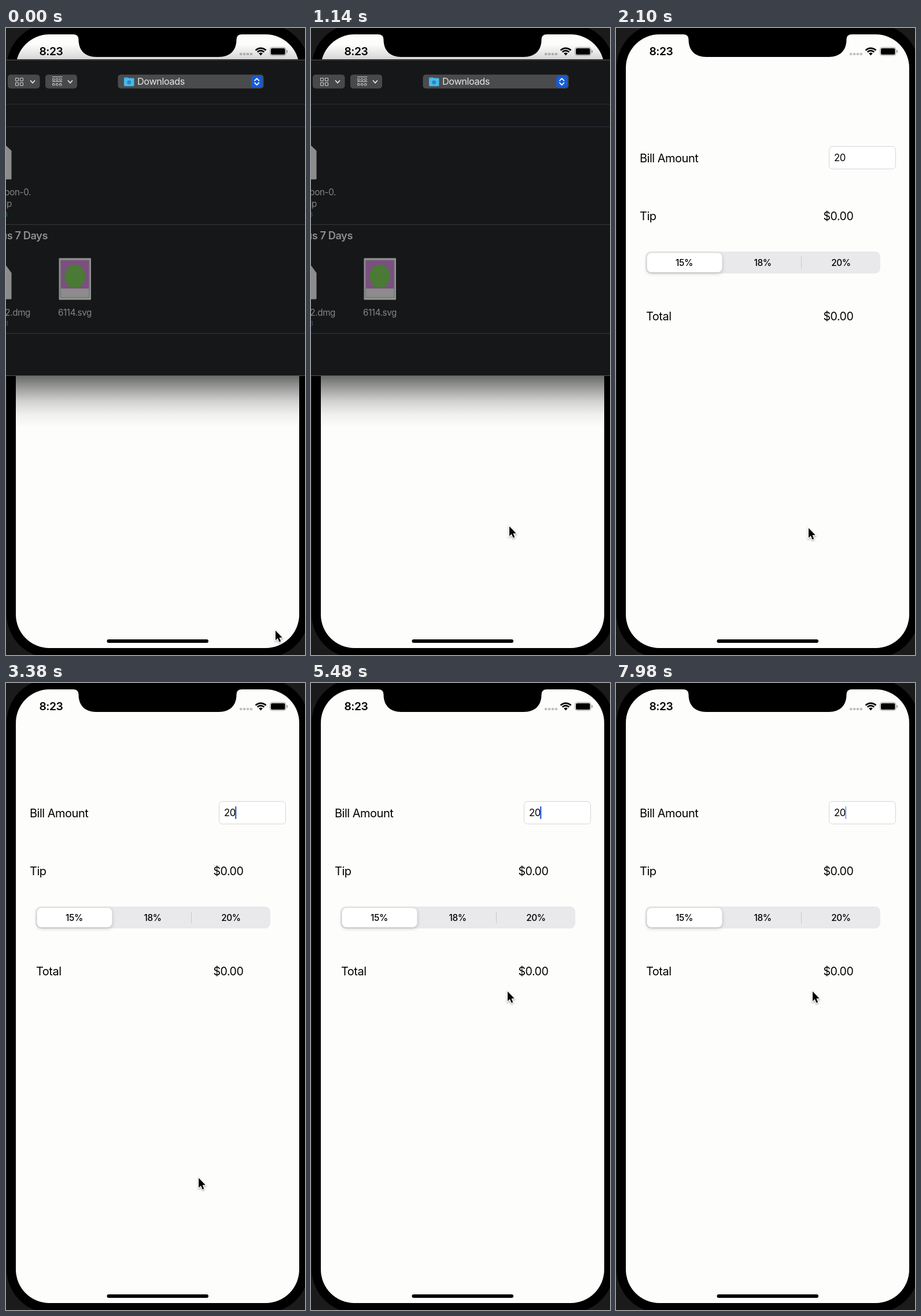
Write an HTML page with a canvas that moves like this. It is 517 px wide and 1083 px high and loops after 8 s.

```html
<!DOCTYPE html>
<html lang="en">
<head>
<meta charset="utf-8">
<title>Tip calculator</title>
<style>
html, body { margin: 0; width: 100%; height: 100%; overflow: hidden; background: #000; }
canvas { display: block; width: 517px; height: 1083px; }
</style>
</head>
<body>
<canvas id="stage" width="517" height="1083"></canvas>
<script>
const W = 517, H = 1083, LOOP = 8000;
const ctx = document.getElementById('stage').getContext('2d');
const FONT = 'Inter, "Liberation Sans", sans-serif';
const PAPER = '#fdfdfc';

function box(x, y, w, h, r, fill, stroke) {
  ctx.beginPath();
  ctx.roundRect(x, y, w, h, r);
  if (fill) { ctx.fillStyle = fill; ctx.fill(); }
  if (stroke) { ctx.strokeStyle = stroke; ctx.lineWidth = 1; ctx.stroke(); }
}

function text(str, x, y, size, color = '#000', weight = 400, align = 'left') {
  ctx.font = `${weight} ${size}px ${FONT}`;
  ctx.letterSpacing = `${(-0.025 * size).toFixed(2)}px`;
  ctx.textAlign = align;
  ctx.fillStyle = color;
  ctx.fillText(str, x, y);
}

function line(points, color, width = 1) {
  ctx.beginPath();
  points.forEach(([x, y]) => ctx.lineTo(x, y));
  ctx.strokeStyle = color;
  ctx.lineWidth = width;
  ctx.lineCap = ctx.lineJoin = 'round';
  ctx.stroke();
}

function fade(y0, y1, stops) {
  const g = ctx.createLinearGradient(0, y0, 0, y1);
  stops.forEach(([at, alpha]) => g.addColorStop(at, `rgba(0,0,0,${alpha})`));
  return g;
}

function drawPhone() {
  ctx.fillStyle = '#1b1b1b';
  ctx.fillRect(0, 0, W, H);
  box(1, -7, 523, 1095, 76, '#000');
  box(17, 11, 490, 1060, 58, PAPER);
}

function drawNotch() {
  ctx.beginPath();
  ctx.moveTo(116, 10);
  ctx.lineTo(116, 11);
  ctx.quadraticCurveTo(125.5, 11, 125.5, 20);
  ctx.bezierCurveTo(125.5, 39, 137, 50, 156, 50);
  ctx.lineTo(368, 50);
  ctx.bezierCurveTo(387, 50, 398.5, 39, 398.5, 20);
  ctx.quadraticCurveTo(398.5, 11, 408, 11);
  ctx.lineTo(408, 10);
  ctx.fillStyle = '#000';
  ctx.fill();
}

function drawStatus() {
  text('8:23', 57.5, 47, 19.3, '#000', 600);
  for (let i = 0; i < 4; i++) box(404 + i * 5.9, 43, 4.4, 4, 1, '#c2c2c2');

  ctx.strokeStyle = '#000';
  ctx.lineCap = 'butt';
  ctx.lineWidth = 2.7;
  for (const r of [12.2, 7.9]) {
    ctx.beginPath();
    ctx.arc(440.5, 47, r, -Math.PI * 0.76, -Math.PI * 0.24);
    ctx.stroke();
  }
  ctx.beginPath();
  ctx.moveTo(440.5, 47.5);
  ctx.arc(440.5, 47, 4.6, -Math.PI * 0.76, -Math.PI * 0.24);
  ctx.fillStyle = '#000';
  ctx.fill();

  box(456.5, 33.5, 27.5, 14, 4, null, '#999');
  box(458, 35, 24.5, 11, 2.5, '#000');
  box(485.3, 38, 1.6, 5, 1, '#999');
}

function drawForm(caret) {
  text('Bill Amount', 41, 232, 20);
  box(368.5, 204.5, 115, 39, 6, '#fff', '#d5d5d5');
  text('20', 377, 230, 16.8);
  if (caret > 0) {
    ctx.globalAlpha = caret;
    box(396, 213, 2.4, 22, 1, '#3a63dc');
    ctx.globalAlpha = 1;
  }

  text('Tip', 41, 332, 20);
  text('$0.00', 358.5, 332, 19.6);

  box(51, 386, 406, 38, 9, '#e9e9eb');
  ctx.save();
  ctx.shadowColor = 'rgba(0,0,0,.22)';
  ctx.shadowBlur = 6;
  ctx.shadowOffsetY = 2;
  box(53.5, 388.5, 130, 33.5, 8, '#fff');
  ctx.restore();
  line([[320.5, 395], [320.5, 415]], '#c9c9cc');
  text('15%', 118, 410.5, 15.4, '#000', 500, 'center');
  text('18%', 253.5, 410.5, 15.4, '#000', 500, 'center');
  text('20%', 389, 410.5, 15.4, '#000', 500, 'center');

  text('Total', 52, 505, 20);
  text('$0.00', 358.5, 505, 19.6);
}

function drawPage(y, h, fold) {
  ctx.beginPath();
  ctx.moveTo(-1, y);
  ctx.lineTo(0, y);
  ctx.lineTo(9.5, y + fold);
  ctx.lineTo(9.5, y + h - 1);
  ctx.lineTo(8.5, y + h);
  ctx.lineTo(-1, y + h);
  ctx.fillStyle = '#8b8c8b';
  ctx.fill();
}

function chevron(x, y, dx, dy, color, width) {
  line([[x - dx, y - dy / 2], [x, y + dy / 2], [x + dx, y - dy / 2]], color, width);
}

function drawToolbar() {
  const button = '#48494a', icon = '#d2d2d2';
  box(3, 80.5, 55.5, 24, 5, button);
  box(68, 80.5, 55, 24, 5, button);
  chevron(46, 93, 3.5, 4, '#e4e4e4', 1.8);
  chevron(111, 93, 3.5, 4, '#e4e4e4', 1.8);

  for (const x of [16.5, 24.5])
    for (const y of [86.5, 94.5]) box(x, y, 5, 5, 0.5, null, icon);
  for (const y of [84.5, 92.5]) line([[80, y], [97, y]], icon);
  for (const x of [80.5, 86.5, 92.5])
    for (const y of [87.5, 96]) box(x, y, 3.6, 3.2, 0.8, null, icon);

  box(193.5, 80.5, 252, 24, 5, '#4a4b4c');
  box(204, 85, 8, 5, 1.5, '#2a9bd6');
  box(204, 86.5, 17.5, 14, 1.5, '#46b9ee');
  ctx.beginPath();
  ctx.arc(212.7, 93.8, 3.4, 0, Math.PI * 2);
  ctx.fillStyle = '#2388be';
  ctx.fill();
  text('Downloads', 227, 98, 16.3, '#e6e6e6');
  box(424, 82.5, 19.5, 20.5, 5, '#165bd6');
  chevron(433.7, 89, 3.7, -3.8, '#fff', 1.8);
  chevron(433.7, 96.5, 3.7, 3.8, '#fff', 1.8);
}

function drawDialog() {
  // Shadow falls on the phone screen only
  ctx.save();
  ctx.beginPath();
  ctx.roundRect(17, 11, 490, 1060, 58);
  ctx.clip();
  ctx.fillStyle = fade(28, 55, [[0, 0], [1, 0.16]]);
  ctx.fillRect(0, 28, W, 27);
  ctx.fillStyle = fade(601, 690, [[0, 0.58], [0.25, 0.37], [0.5, 0.17], [0.75, 0.05], [1, 0]]);
  ctx.fillRect(0, 601, W, 89);
  ctx.restore();

  ctx.fillStyle = '#161718';
  ctx.fillRect(0, 54, W, 547);
  const rules = [[55, '#4a4b4c'], [131, '#2b303b'], [170, '#2d333d'],
    [339, '#373a38'], [527, '#35382f'], [600, '#535453']];
  for (const [y, color] of rules) {
    ctx.fillStyle = color;
    ctx.fillRect(0, y, W, 1);
  }
  drawToolbar();

  const gray = '#858687', blue = '#2b5d78';
  drawPage(203, 58.5, 9);
  text('bon-0.', 43, 289, 15.2, gray, 400, 'right');
  text('zip', 10, 308.5, 15.2, gray, 400, 'right');
  text('MB', 3, 325.5, 11, blue, 400, 'right');
  text('Previous 7 Days', 72, 364.5, 18.3, '#8d8e8f', 600, 'right');
  drawPage(410, 58.5, 13);
  text('2.dmg', 42, 496.5, 15.2, gray, 400, 'right');
  text('MB', 4, 513.5, 11, blue, 400, 'right');

  box(91.5, 397.5, 55.5, 72, 1, '#929392');
  box(94.5, 401, 49.5, 64.5, 0, '#8b8c8b', '#6b6b6b');
  ctx.fillStyle = '#7b4f80';
  ctx.fillRect(95, 401.5, 48.5, 48.5);
  ctx.beginPath();
  ctx.ellipse(119, 429, 18, 20.5, 0, 0, Math.PI * 2);
  ctx.fillStyle = '#4a7a35';
  ctx.fill();
  text('6114.svg', 119, 496.5, 15.2, gray, 400, 'center');
}

function drawPointer(x, y) {
  ctx.save();
  ctx.translate(x, y + 0.8);
  ctx.beginPath();
  ctx.moveTo(0, 0);
  ctx.lineTo(0, 16.8);
  ctx.lineTo(3.8, 13.2);
  ctx.lineTo(6.5, 19.6);
  ctx.lineTo(9.2, 18.4);
  ctx.lineTo(6.5, 12.2);
  ctx.lineTo(11.6, 12);
  ctx.closePath();
  ctx.lineJoin = 'miter';
  ctx.strokeStyle = '#fff';
  ctx.lineWidth = 2.4;
  ctx.shadowColor = 'rgba(0,0,0,.35)';
  ctx.shadowBlur = 3;
  ctx.shadowOffsetY = 1.5;
  ctx.stroke();
  ctx.shadowColor = 'transparent';
  ctx.fillStyle = '#000';
  ctx.fill();
  ctx.restore();
}

function tickAt(ms) {
  const part = ms % 140;
  return Math.floor(ms / 140) * 3 + (part < 20 ? 0 : part < 120 ? 1 : 2);
}

const ease = p => p < 0.5 ? 4 * p ** 3 : 1 - 4 * (1 - p) ** 3;

// [tick, x, y] stops of the pointer
const PATH = [[0, 466, 1040], [17, 466, 1040], [25, 343, 860], [35, 333, 863],
  [70, 333, 863], [86, 340, 532], [180, 340, 532]];

function pointerAt(tick) {
  const i = PATH.findIndex(stop => stop[0] > tick);
  const [t0, x0, y0] = PATH[i - 1], [t1, x1, y1] = PATH[i];
  const p = ease((tick - t0) / (t1 - t0));
  return [x0 + (x1 - x0) * p, y0 + (y1 - y0) * p];
}

// Blink over 60 ticks: on, fade out, off, fade in
function caretAt(tick) {
  const phase = ((tick + 4.5) % 60) / 60;
  if (phase < 0.5) return 1;
  if (phase < 0.65) return (0.65 - phase) / 0.15;
  return Math.max(0, (phase - 0.85) / 0.15);
}

function draw(now) {
  const tick = tickAt(now % LOOP);
  drawPhone();
  drawNotch();
  drawStatus();
  if (tick < 45) drawDialog();
  else drawForm(caretAt(tick));
  box(174.5, 1056, 175.5, 6, 3, '#000');
  drawPointer(...pointerAt(tick));
}

const start = performance.now();
function loop() {
  draw(performance.now() - start);
  requestAnimationFrame(loop);
}
loop();
</script>
</body>
</html>
```
